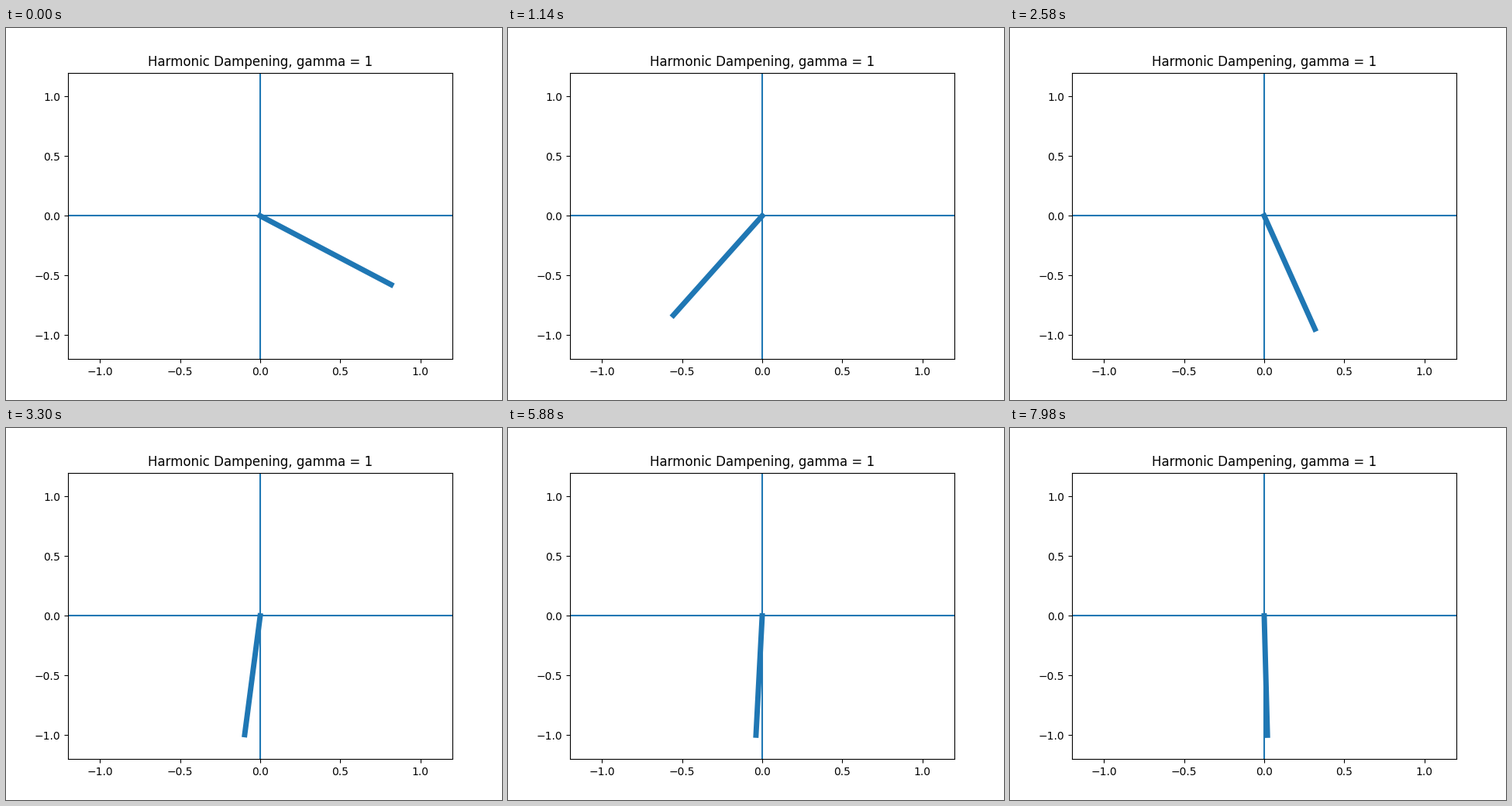
A matplotlib script that plays this animation: 640x480 px, repeating every 8000 ms.

```python
import numpy as np
import matplotlib.pyplot as plt
from matplotlib.animation import FuncAnimation

GAMMA = 1        # damping rate
OMEGA0 = 3       # undamped angular frequency
DT = 0.05        # simulated time per pose
START = 2        # poses already passed when the loop begins
TICK_MS = 20
HOLD = 3         # ticks per pose, i.e. 60 ms
LOOP_MS = 8000

omega = np.sqrt(OMEGA0**2 - GAMMA**2 / 4)


def angle(t):
    """Underdamped oscillator released at rest from 1 rad."""
    swing = np.cos(omega * t) + GAMMA / (2 * omega) * np.sin(omega * t)
    return np.exp(-GAMMA * t / 2) * swing


fig, ax = plt.subplots(figsize=(6.4, 4.8), dpi=100)
ax.set_xlim(-1.2, 1.2)
ax.set_ylim(-1.2, 1.2)
ax.set_title(f"Harmonic Dampening, gamma = {GAMMA}")
ax.axhline(0)
ax.axvline(0)
rod, = ax.plot([], [], color="C0", lw=5)


def update(tick):
    theta = angle(DT * (START + tick // HOLD))
    rod.set_data([0, np.sin(theta)], [0, -np.cos(theta)])
    return rod,


anim = FuncAnimation(fig, update, frames=LOOP_MS // TICK_MS,
                     interval=TICK_MS, repeat=True, repeat_delay=0, blit=True)
plt.show()
```
